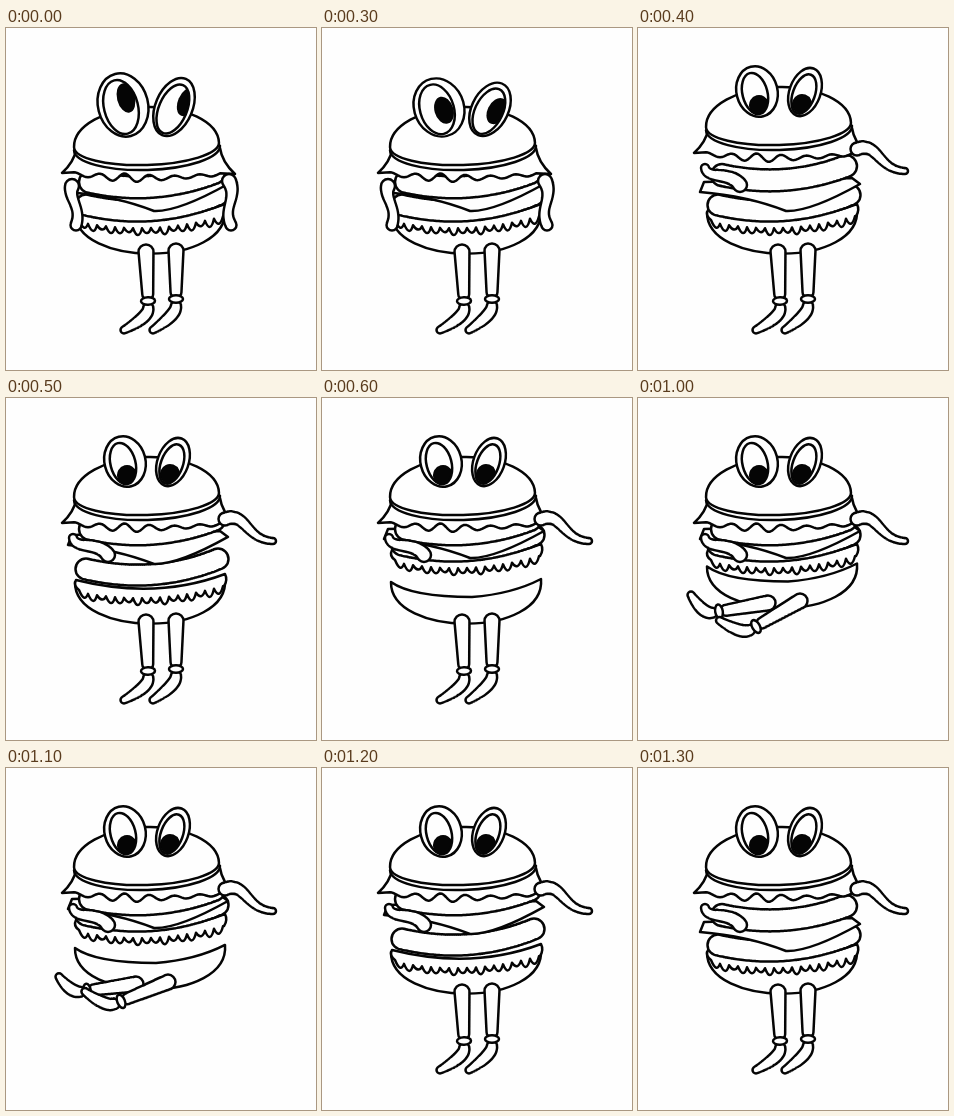
Write an HTML page with a canvas that moves like this. It is 310x342 px and loops after 1.4 s.

```html
<!DOCTYPE html>
<html lang="en">
<head>
<meta charset="utf-8">
<title>Burger stretch</title>
<style>
html, body { margin: 0; width: 100%; height: 100%; overflow: hidden; background: #fefefe; }
canvas { display: block; width: 310px; height: 342px; }
</style>
</head>
<body>
<canvas id="stage"></canvas>
<script>
const W = 310, H = 342, LOOP = 1400, TAU = Math.PI * 2;
const PAPER = '#fefefe', INK = '#050505', LINE = 2.5;
const canvas = document.getElementById('stage');
const ctx = canvas.getContext('2d');
const ratio = window.devicePixelRatio || 1;
canvas.width = W * ratio;
canvas.height = H * ratio;

const mix = (a, b, t) => a + (b - a) * t;
const between = (p, q, t) => [mix(p[0], q[0], t), mix(p[1], q[1], t)];
const ramp = (x, from, to) => Math.max(0, Math.min(1, (x - from) / (to - from)));

function ink(path) {
  ctx.fillStyle = PAPER;
  ctx.fill(path);
  ctx.stroke(path);
}

function lifted(dy, draw) {
  ctx.save();
  ctx.translate(0, dy);
  draw();
  ctx.restore();
}

// Point on a Bezier curve with any number of control points.
function bezier(pts, t) {
  while (pts.length > 1) pts = pts.slice(1).map((p, i) => between(pts[i], p, t));
  return pts[0];
}

// Outlined tube: discs swept along a curve, radius r0 to r1, swollen midway by bulge.
function tube(pts, r0, r1 = r0, bulge = 0) {
  const steps = 70;
  for (const [grow, colour] of [[LINE / 2, INK], [-LINE / 2, PAPER]]) {
    ctx.fillStyle = colour;
    ctx.beginPath();
    for (let i = 0; i <= steps; i++) {
      const t = i / steps, [x, y] = bezier(pts, t);
      const r = mix(r0, r1, t) + bulge * Math.sin(Math.PI * t) + grow;
      ctx.moveTo(x + r, y);
      ctx.arc(x, y, r, 0, TAU);
    }
    ctx.fill();
  }
}

function drawTopBun() {
  const rim = new Path2D();
  rim.ellipse(141, 120, 73, 22, -0.03, 0, Math.PI);
  ink(rim);
  const bun = new Path2D();
  bun.ellipse(140.5, 117, 72.5, 20, -0.03, 0, Math.PI);
  bun.ellipse(140.5, 117, 72.5, 38, -0.03, Math.PI, TAU);
  bun.closePath();
  ink(bun);
}

function drawLettuce() {
  const path = new Path2D('M70 122 Q68 134 56 145');
  for (let x = 68; x <= 214; x += 2) {
    const u = (x - 141) / 73;
    const swing = 1.6 + 2.6 * Math.exp(-(((x - 122) / 30) ** 2));
    path.lineTo(x, 150 - 4 * u * u + swing * Math.cos(TAU * (x - 131) / 25));
  }
  path.lineTo(229, 146);
  path.quadraticCurveTo(216, 134, 214, 120);
  ink(path);
}

const drawPatty = () => tube([[84, 154], [148, 168], [208, 145]], 11);
const drawCheese = () => ink(new Path2D(
  'M66 154 L62 164 Q110 168 148 183 Q172 184 222 156 L214 150 Z'));
const drawSlab = () => tube([[80, 177], [148, 193], [212, 167]], 10.5);

function drawFringe() {
  const count = 16, left = 73, step = 144 / count;
  const edge = x => {
    const u = (x - 145) / 73;
    return 200 - 3 * u - 9 * u * u;
  };
  const path = new Path2D('M218 188 Q222 182 219 176 Q150 202 70 182 Q67 188 73 192');
  for (let i = 0; i < count; i++) {
    const x = left + i * step, drop = 11 + 3 * Math.sin(i * 2.3);
    path.quadraticCurveTo(x + step * 0.6, edge(x) + drop, x + step, edge(x + step));
  }
  path.closePath();
  ink(path);
}

const drawLowBun = () => ink(new Path2D(
  'M69 184 Q90 199 150 199 Q190 196 219 181 C224 240 68 240 69 184 Z'));

function drawArms(out) {
  if (out) {
    tube([[67, 140], [70, 152], [92, 143], [102, 157]], 4, 7);
    tube([[219, 121], [240, 113], [240, 142], [267, 143]], 6.5, 3);
  } else {
    tube([[66, 158], [62, 170], [76, 180], [70, 197]], 7, 5.5, -1.5);
    tube([[223, 153], [232, 170], [216, 180], [225, 197]], 7, 5.5, -1.5);
  }
}

// The foot leaves the ankle in the line of the thigh and bends to the toe.
function drawLeg(hip, ankle, toe) {
  const dx = ankle[0] - hip[0], dy = ankle[1] - hip[1], length = Math.hypot(dx, dy);
  const along = d => [ankle[0] + dx / length * d, ankle[1] + dy / length * d];
  tube([along(7), along(16), toe], 5, 3.5, 1.5);
  tube([hip, along(-7)], 7.5, 5.5);
  const cuff = new Path2D();
  cuff.ellipse(...ankle, 3.8, 7, Math.atan2(dy, dx), 0, TAU);
  ink(cuff);
}

// sit runs from 0, legs along the ground, to 1, legs pulled up.
function drawLegs(sit) {
  if (sit > 0) {
    drawLeg([130, 220 - 30 * sit], [81, 226 - 25 * sit], [53, 213 - 32 * sit]);
    drawLeg([162, 218 - 30 * sit], [114 + 8 * sit, 235 - 13 * sit], [78 + 7 * sit, 224 - 3 * sit]);
  } else {
    drawLeg([140, 224], [142, 273], [118, 302]);
    drawLeg([170, 223], [170, 271], [147, 302]);
  }
}

const eye = (x, y, rx, ry, tilt, rim) => ({ x, y, rx, ry, tilt, rim });
const wide = [eye(117, 77, 25, 32, -0.25, 8), eye(168, 79, 18.5, 30.5, 0.4, 4.5)];
const small = [eye(119, 63.5, 20.5, 25.5, -0.25, 8), eye(167, 64, 15.5, 25, 0.35, 4.5)];
const looks = {
  up: { eyes: wide, pupils: [[120, 70], [181, 74]], size: [9, 15], squash: 1 },
  side: { eyes: wide, pupils: [[122, 80], [175, 81]], size: [9.5, 15], squash: 0.92 },
  down: { eyes: small, pupils: [[121, 77], [164, 76]], size: [10, 10], squash: 1 }
};

function drawEyes({ eyes, pupils, size, squash }) {
  ctx.save();
  ctx.translate(0, 108 * (1 - squash));
  ctx.scale(1, squash);
  eyes.forEach(({ x, y, rx, ry, tilt, rim }, i) => {
    const outer = new Path2D(), inner = new Path2D();
    outer.ellipse(x, y, rx, ry, tilt, 0, TAU);
    inner.ellipse(x - rim / 4, y + 2, rx - rim, ry - 4.5, tilt, 0, TAU);
    ink(outer);
    ctx.save();
    ctx.clip(inner);
    ctx.fillStyle = INK;
    ctx.beginPath();
    ctx.ellipse(...pupils[i], ...size, tilt, 0, TAU);
    ctx.fill();
    ctx.restore();
    ctx.stroke(inner);
  });
  ctx.restore();
}

// Each layer rises by its height while the stretch level passes its range.
const layer = (draw, height, from, to) => ({ draw, height, from, to });
const layers = [
  layer(drawLowBun, 31, 3, 4),
  layer(drawFringe, 30, 2, 3),
  layer(drawSlab, 30, 1.75, 3),
  layer(drawCheese, 23, 1, 2.35),
  layer(drawPatty, 23, 0.57, 2),
  layer(drawLettuce, 20, 0, 1),
  layer(drawTopBun, 20, 0, 1)
];

// Stretch level by 100 ms step; the picture changes in hard steps.
const levels = [0, 0, 0, 0, 1, 2, 3, 4, 4, 4, 3.5, 3.13, 2, 1];

function draw(time) {
  const step = Math.floor(time / 100), level = levels[step];
  const look = level > 0 ? 'down' : step < 3 ? 'up' : 'side';
  ctx.setTransform(ratio, 0, 0, ratio, 0, 0);
  ctx.fillStyle = PAPER;
  ctx.fillRect(0, 0, W, H);
  ctx.strokeStyle = INK;
  ctx.lineWidth = LINE;
  ctx.lineJoin = ctx.lineCap = 'round';

  for (const { draw, height, from, to } of layers) {
    lifted(-height * ramp(level, from, to), draw);
  }
  drawArms(level > 0);
  drawLegs(ramp(level, 3, 4));
  drawEyes(looks[look]);
}

function tick() {
  draw(performance.now() % LOOP);
  requestAnimationFrame(tick);
}
tick();
</script>
</body>
</html>
```
